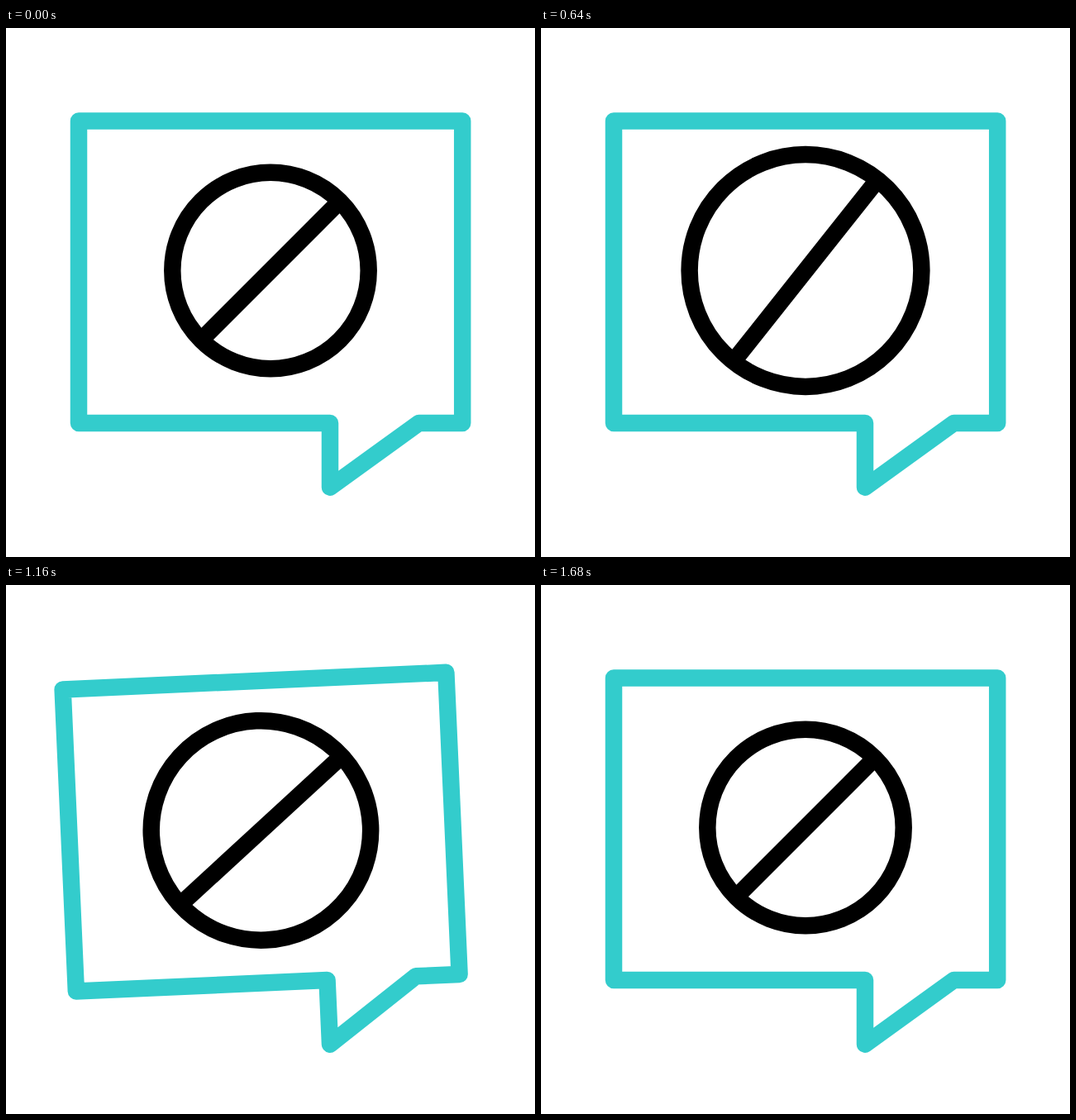
An HTML page for the animation above (1720 ms loop, 640 by 640 pixels).

```html
<!DOCTYPE html>
<html lang="en">
<head>
<meta charset="utf-8">
<title>Blocked message</title>
<style>
  html, body { margin: 0; width: 100%; height: 100%; overflow: hidden; background: #fff; }
  svg { display: block; width: 100vw; height: 100vh; }
</style>
</head>
<body>
<svg viewBox="0 0 640 640" fill="none" stroke-width="20.5">
  <g id="bubble">
    <path d="M88 112.5H552.2V478H499.5L392 555.7V478H88Z" stroke="#33cccc" stroke-linejoin="round"/>
    <g stroke="#000" transform="translate(320 293.5)">
      <circle id="ring"/>
      <line id="slash"/>
    </g>
  </g>
</svg>
<script>
const LOOP = 1720, STEP = 40;
const [bubble, ring, slash] = ['bubble', 'ring', 'slash'].map(id => document.getElementById(id));

// Keyframes as [time, value]; angles in degrees, clockwise
const tilt = [[40, 0], [440, -6], [840, 6], [1240, -3], [1640, 0]];
const turn = [[40, 0], [400, 10.8], [738, -9], [1190, 5], [1490, 0]];
const radius = [[85, 118.7], [740, 141], [840, 141], [1560, 118.7]];

// Cubic bezier ease (.58, 0, .42, 1)
function ease(x) {
  let lo = 0, hi = 1;
  for (let i = 0; i < 24; i++) {
    const t = (lo + hi) / 2;
    if (1.74 * t - 2.22 * t * t + 1.48 * t * t * t < x) lo = t; else hi = t;
  }
  return lo * lo * (3 - 2 * lo);
}

function valueAt(keys, time) {
  if (time <= keys[0][0]) return keys[0][1];
  for (let i = 1; i < keys.length; i++) {
    const [t0, a] = keys[i - 1], [t1, b] = keys[i];
    if (time < t1) return a + (b - a) * ease((time - t0) / (t1 - t0));
  }
  return keys[keys.length - 1][1];
}

function draw(time) {
  const r = valueAt(radius, time);
  bubble.setAttribute('transform', `rotate(${valueAt(tilt, time)} 392 555.7)`);
  ring.setAttribute('r', r);
  slash.setAttribute('x1', -r);
  slash.setAttribute('x2', r);
  slash.setAttribute('transform', `rotate(${valueAt(turn, time) - 45})`);
}

const start = performance.now();
function tick() {
  const time = (performance.now() - start) % LOOP;
  draw(Math.floor(time / STEP) * STEP);
  requestAnimationFrame(tick);
}
tick();
</script>
</body>
</html>
```
